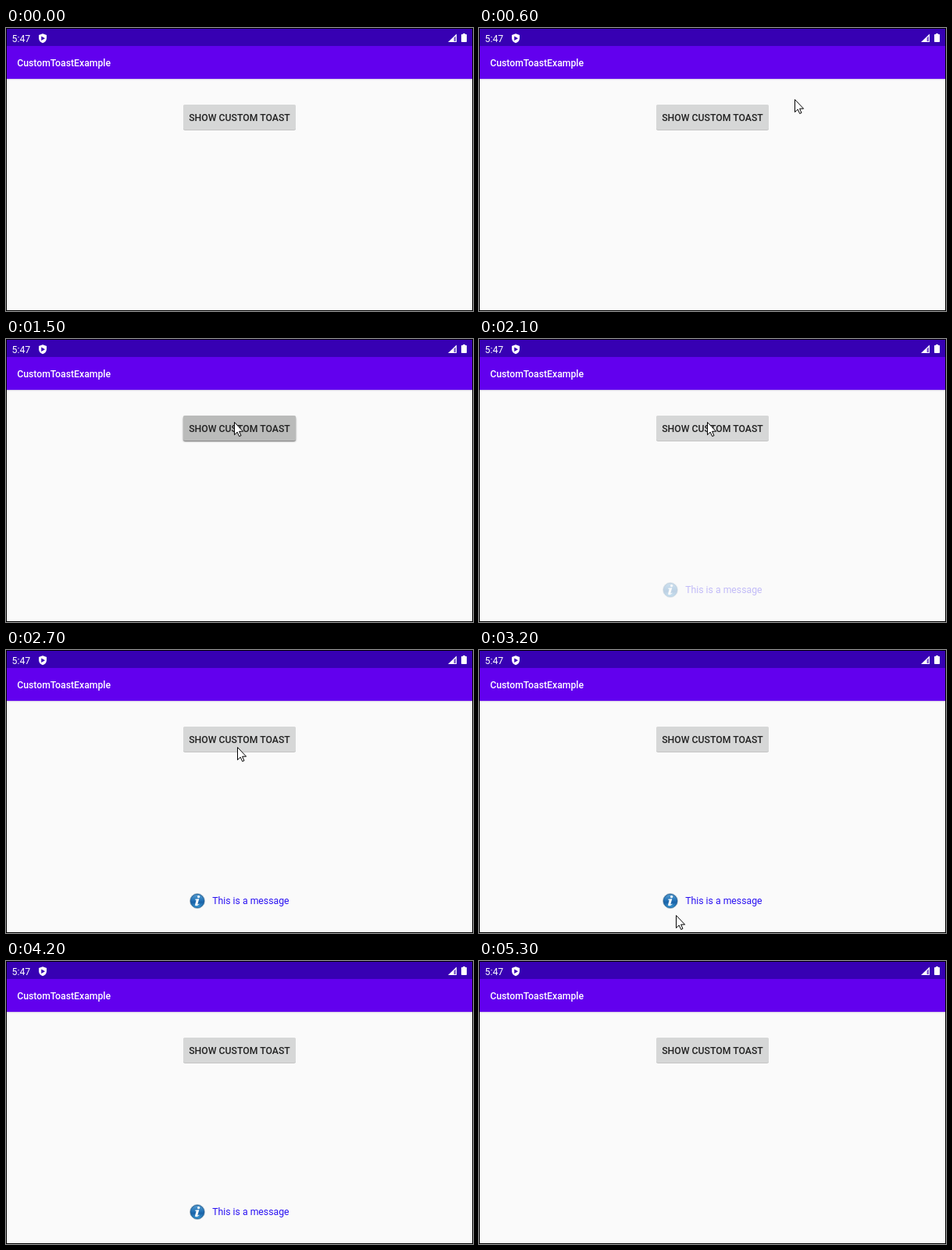
Animation, 598 px wide and 362 px high, one loop 6 s. Source, as an HTML page:

```html
<!DOCTYPE html>
<html lang="en">
<head>
<meta charset="utf-8">
<title>Custom toast</title>
<style>
  html, body { margin: 0; width: 100%; height: 100%; overflow: hidden; background: #000; }
  svg { display: block; width: 598px; height: 362px; }
  text { font-family: Roboto, sans-serif; font-size: 12.25px; }
  .medium { font-weight: 500; }
  .face, .lift, .toast, .cursor { animation: 6s step-end infinite; }
  .face { fill: #d6d7d7; animation-name: press; }
  .lift { opacity: 0; animation-name: lift; }
  .toast { opacity: 0; animation-name: toast; }
  .cursor { visibility: hidden; animation-name: move; }

  @keyframes press {
    0%, 30% { fill: #d6d7d7; }
    25% { fill: #babbba; }
  }
  @keyframes lift {
    0%, 33.33% { opacity: 0; }
    25% { opacity: 1; }
  }
  @keyframes toast {
    0% { opacity: 0; }
    33.33% { opacity: .06; }
    35% { opacity: .27; }
    36.66% { opacity: .5; }
    38.33% { opacity: .73; }
    40% { opacity: .92; }
    41.66% { opacity: 1; }
    83.33% { opacity: .8; }
    85% { opacity: .48; }
    86.66% { opacity: .2; }
    88.33%, 100% { opacity: 0; }
  }
  @keyframes move {
    0% { visibility: hidden; transform: translate(540px, 68px); }
    5% { visibility: visible; transform: translate(540px, 68px); }
    6.66% { visibility: visible; transform: translate(517px, 72px); }
    8.33% { visibility: visible; transform: translate(464px, 81px); }
    10% { visibility: visible; transform: translate(404px, 91px); }
    11.66% { visibility: visible; transform: translate(348px, 100px); }
    13.33% { visibility: visible; transform: translate(308px, 105px); }
    15% { visibility: visible; transform: translate(293px, 106px); }
    18.33% { visibility: visible; transform: translate(292px, 106px); }
    45% { visibility: visible; transform: translate(296px, 124px); }
    46.66% { visibility: visible; transform: translate(309px, 170px); }
    48.33% { visibility: visible; transform: translate(311px, 222px); }
    50% { visibility: visible; transform: translate(278px, 276px); }
    51.66% { visibility: visible; transform: translate(222px, 320px); }
    53.33% { visibility: visible; transform: translate(252px, 339px); }
    55% { visibility: visible; transform: translate(298px, 328px); }
    56.66% { visibility: visible; transform: translate(317px, 311px); }
    58.33% { visibility: visible; transform: translate(316px, 292px); }
    60% { visibility: visible; transform: translate(305px, 278px); }
    61.66% { visibility: visible; transform: translate(285px, 271px); }
    63.33% { visibility: visible; transform: translate(262px, 271px); }
    65% { visibility: visible; transform: translate(246px, 276px); }
    66.66% { visibility: visible; transform: translate(235px, 285px); }
    68.33% { visibility: visible; transform: translate(233px, 319px); }
    70%, 100% { visibility: hidden; transform: translate(233px, 319px); }
  }
</style>
</head>
<body>
<svg viewBox="0 0 598 362">
  <defs>
    <linearGradient id="ball" x1="0" y1="0" x2="0" y2="1">
      <stop offset="0" stop-color="#5fa3d3"/>
      <stop offset=".45" stop-color="#2474b8"/>
      <stop offset=".6" stop-color="#1a63a8"/>
      <stop offset="1" stop-color="#3fa3dd"/>
    </linearGradient>
    <filter id="soft" x="-10%" y="-30%" width="120%" height="160%">
      <feGaussianBlur stdDeviation="1.3"/>
    </filter>
    <filter id="faint" x="-10%" y="-30%" width="120%" height="160%">
      <feGaussianBlur stdDeviation=".6"/>
    </filter>
  </defs>

  <rect width="598" height="362"/>
  <rect x="1" y="1" width="596" height="360" fill="#fafafa"/>
  <rect x="1" y="65" width="596" height="1" fill="#d9d0e8"/>
  <rect x="1" y="66" width="596" height="1" fill="#f2f1f5"/>
  <rect x="1" y="23" width="596" height="42" fill="#6200ee"/>
  <rect x="1" y="1" width="596" height="22" fill="#3700b3"/>

  <g fill="#fff">
    <text x="7.6" y="18">5:47</text>
    <path d="M47 7.2 52 9.1V13C52 16 50 18.4 47 19.3 44 18.4 42 16 42 13V9.1Z"/>
    <path d="M45.2 10.4 50 13.2 45.2 16Z" fill="#3700b3"/>
    <path d="M577 7.5V18H566Z"/>
    <path d="M573.6 12.4 575.9 10.2V16.9H573.6Z" fill="#3700b3" opacity=".7"/>
    <path d="M585 8V7H588V8H589.3Q590 8 590 8.7V17.3Q590 18 589.3 18H583.7Q583 18 583 17.3V8.7Q583 8 583.7 8Z"/>
    <text class="medium" x="14.2" y="48.8">CustomToastExample</text>
  </g>

  <rect x="227" y="98.7" width="144" height="32" rx="2" opacity=".28" filter="url(#faint)"/>
  <rect class="lift" x="227" y="99.5" width="144" height="31.5" rx="2" fill-opacity=".45" filter="url(#soft)"/>
  <rect class="face" x="227" y="98" width="144" height="32" rx="1.8"/>
  <text class="medium" x="299" y="118.7" text-anchor="middle" fill="#212121">SHOW CUSTOM TOAST</text>

  <g class="toast">
    <circle cx="245" cy="321" r="9.4" fill="url(#ball)" stroke="#a9b9c6" stroke-width="1"/>
    <circle cx="245" cy="321" r="8.6" fill="none" stroke="#1c5c96" stroke-width=".8"/>
    <g fill="#fff">
      <circle cx="246.6" cy="315.6" r="1.6"/>
      <path d="M242.2 318.8 247.3 318.2 245.3 325.2Q245.5 325.9 247.3 324.6L247.6 325.2Q245.3 327.5 243.2 327.3 241.7 327 242.2 325.2L243.6 320.2Q243.6 319.5 242.1 319.5Z"/>
    </g>
    <text x="264.2" y="324.5" fill="#2a12f2">This is a message</text>
  </g>

  <path class="cursor" d="M.5.5V16.6L4.2 13.1 6.7 18.5 9 17.5 6.6 12.2H11.6Z" fill="#fff" stroke="#000"/>
</svg>
</body>
</html>
```
